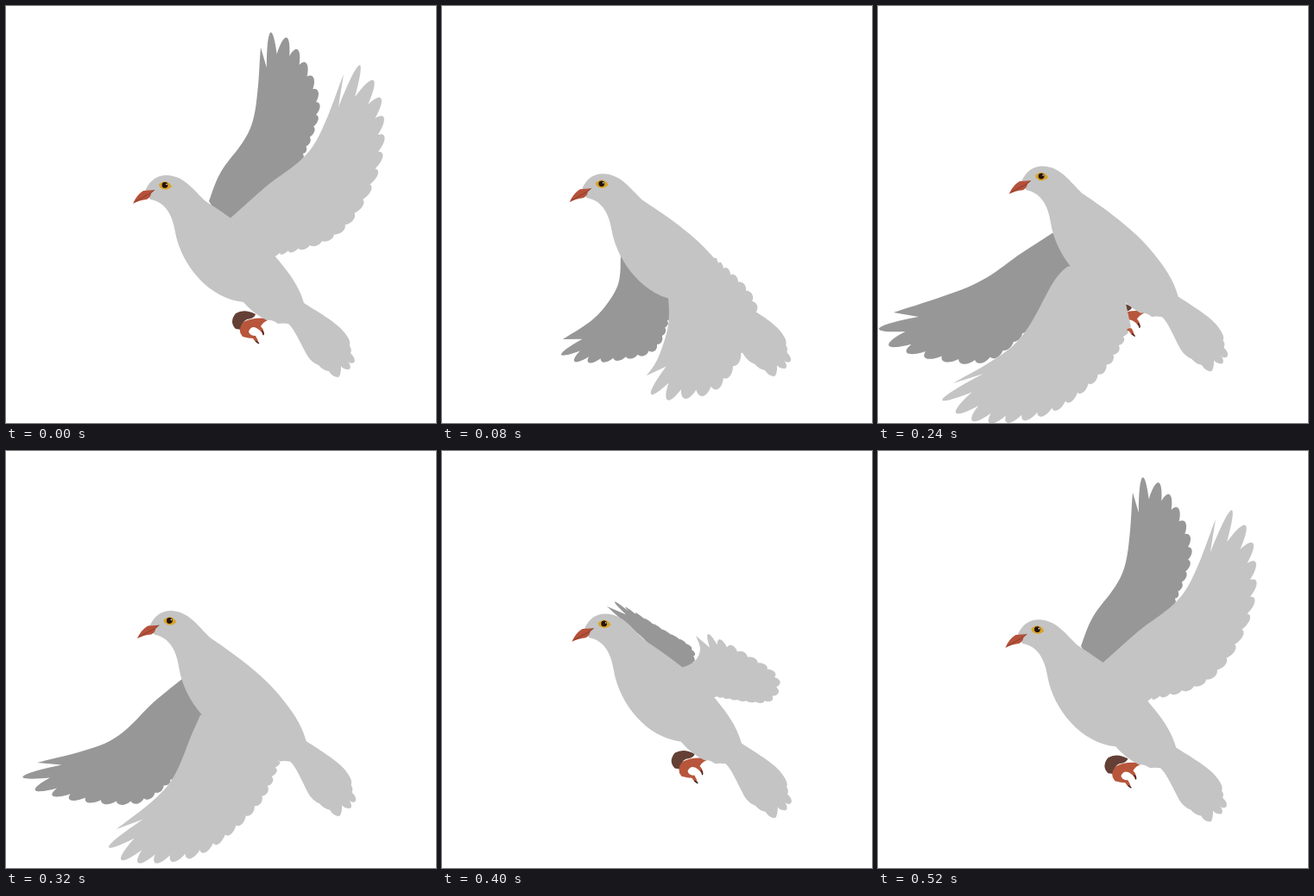
These frames come from a looping animation (498x483 px, 560 ms). An HTML page:

```html
<!DOCTYPE html>
<html lang="en">
<head>
<meta charset="utf-8">
<title>Flying dove</title>
<style>
  html, body { margin: 0; width: 100%; height: 100%; overflow: hidden; background: #fff; }
  svg { display: block; width: 498px; height: 483px; }
</style>
</head>
<body>
<svg viewBox="0 0 498 483">
  <path id="far" fill="#979797"/>
  <g id="feet">
    <path fill="#643f35" d="M289 357 Q276 350 266 356 Q258 366 266 374 L274 375 Q272 366 279 363 Q288 362 289 357Z"/>
    <path fill="#b8563b" d="M303 362 Q286 360 275 366 Q267 375 274 383 Q281 385 286 385 Q289 390 293 391 Q291 385 289 382 Q282 382 281 377 Q284 370 290 373 Q296 376 298 382 Q300 376 295 371 Q298 366 303 364Z"/>
    <path fill="none" stroke="#3a2420" stroke-width="1.4" d="M289 388 L293 391 M296 376 Q299 378 298 381"/>
  </g>
  <g id="body">
    <path fill="#c4c4c4" d="M161 215 C164 206 172 196 185 196 C206 196 217 213 231 226 C265 248 299 272 320 300 C334 317 341 330 345 344 C362 355 386 368 394 381 Q400 389 398 394 Q401 398 399 402 Q406 409 403 413 Q398 415 396 411 Q401 419 397 421 Q390 421 388 417 Q388 428 385 430 Q378 430 374 423 Q367 422 362 416 Q354 413 349 405 C340 389 334 374 327 368 Q320 367 315 368 Q308 363 302 364 Q286 356 275 343 C235 339 203 300 196 262 C193 243 185 227 167 224Z"/>
    <path fill="#b5513a" d="M147 229 Q151 219 159 214 L172 213 L168 217 Q168 221 163 224 Q154 225 147 229Z"/>
    <path fill="none" stroke="#7d3a2b" stroke-width=".8" d="M149 227 Q158 222 167 217 L172 213"/>
    <path fill="#d9a428" d="M177 207 Q184 200 190 206 L192 209 Q185 216 178 210Z"/>
    <circle cx="184" cy="207.5" r="3.4" fill="#24130c"/>
    <circle cx="186" cy="206.5" r=".8" fill="#fff"/>
  </g>
  <path id="near" fill="#c4c4c4"/>
</svg>
<script>
const LOOP = 560, STEP = 40, LEAD = 3;
const ROOT = [275, 290];

// Each pose: root, wrist, bend and tip of the leading edge, then the rim of the fan.
const pose = text => text.split(' ').map(p => p.split(',').map(Number));

const near = {
  up: pose('255,250 300,210 355,163 391,79 406,67 434,105 434,185 388,263 312,290'),
  side: pose('262,262 305,240 390,205 478,178 487,192 478,222 445,262 390,306 330,318'),
  down: pose('262,335 262,370 250,408 237,428 242,449 268,456 325,439 366,352 318,292'),
  spread: pose('219,302 203,320 160,390 87,437 76,458 120,483 200,472 262,424 293,372'),
  back: pose('225,306 216,326 187,388 128,438 120,460 148,477 225,468 292,412 320,355'),
  fold: pose('275,252 292,244 299,230 294,214 305,211 350,233 390,262 378,291 316,285')
};
const far = {
  up: pose('235,226 249,192 285,136 295,48 306,31 331,42 357,85 363,125 345,175'),
  side: pose('235,228 265,205 335,150 412,108 422,114 424,140 408,178 380,220 340,250'),
  down: pose('207,290 203,325 178,360 140,386 137,402 160,413 210,410 248,398 264,362'),
  spread: pose('202,263 165,287 110,323 18,355 2,370 12,393 70,411 130,411 180,370'),
  back: pose('204,264 172,290 120,336 36,361 20,375 32,392 85,406 155,408 195,380'),
  fold: pose('255,240 232,216 212,199 191,180 194,173 217,183 255,206 290,228 292,248')
};
const keys = [
  [0, 'up'], [40, 'side'], [80, 'down'], [160, 'spread'], [240, 'spread'],
  [320, 'back'], [400, 'fold'], [520, 'up'], [LOOP, 'up']
];

const mix = (a, b, u) => [a[0] + (b[0] - a[0]) * u, a[1] + (b[1] - a[1]) * u];
const str = p => p[0].toFixed(1) + ' ' + p[1].toFixed(1);

// Catmull-Rom curve through the points, as a fine polyline
function spline(pts, n = 12) {
  const out = [pts[0]];
  for (let i = 0; i < pts.length - 1; i++) {
    const b = pts[i], c = pts[i + 1], a = pts[i - 1] || b, d = pts[i + 2] || c;
    for (let k = 1; k <= n; k++) {
      const u = k / n;
      out.push([0, 1].map(j => b[j] + .5 * u * (c[j] - a[j] +
        u * (2 * a[j] - 5 * b[j] + 4 * c[j] - d[j] + u * (3 * (b[j] - c[j]) + d[j] - a[j])))));
    }
  }
  return out;
}

// Feather tips along the rim, each a little narrower than the one before
function featherTips(rim, count) {
  const line = spline(rim), sum = [0];
  for (let i = 1; i < line.length; i++)
    sum.push(sum[i - 1] + Math.hypot(line[i][0] - line[i - 1][0], line[i][1] - line[i - 1][1]));
  const total = sum[sum.length - 1];
  return Array.from({ length: count + 1 }, (_, k) => {
    const s = total * (1 - (1 - k / count) ** 1.3);
    const i = Math.max(1, sum.findIndex(v => v >= s - 1e-6));
    return mix(line[i - 1], line[i], (s - sum[i - 1]) / (sum[i] - sum[i - 1]));
  });
}

function feather(from, tip, to) {
  const c = mix(mix(from, to, .5), tip, 4 / 3);
  const side = [0, 1].map(j => (to[j] - from[j]) * .27);
  return 'C' + str([c[0] - side[0], c[1] - side[1]]) + ' ' + str([c[0] + side[0], c[1] + side[1]]) + ' ' + str(to);
}

function wingPath(pts, count) {
  const lead = spline(pts.slice(0, LEAD + 1));
  const tips = featherTips(pts.slice(LEAD), count);
  const heart = mix(pts[1], pts[LEAD + 4], .5);
  const notches = tips.slice(1).map((tip, i) =>
    mix(mix(tips[i], tip, .5), heart, .06 + .21 * Math.exp(-.6 * i)));
  let d = 'M' + lead.map(str).join('L') + 'L' + str(notches[0]);
  for (let i = 1; i < count; i++) d += feather(notches[i - 1], tips[i], notches[i]);
  return d + 'L' + str(tips[count]) + 'L' + str(ROOT) + 'Z';
}

function wingAt(poses, t) {
  const i = keys.findIndex((k, n) => t < keys[n + 1][0]);
  const [t0, a] = keys[i], [t1, b] = keys[i + 1];
  return poses[a].map((p, n) => mix(p, poses[b][n], (t - t0) / (t1 - t0)));
}

const el = id => document.getElementById(id);

function draw(t) {
  const lift = 1.05 * Math.sin(Math.PI * (t - 10) / LOOP) ** 2;
  const move = x => `translate(${x * lift} ${-7 * lift}) rotate(${1.1 * lift} 384 430)`;
  el('body').setAttribute('transform', move(1));
  el('feet').setAttribute('transform', move(4));
  el('near').setAttribute('d', wingPath(wingAt(near, t), 17));
  el('far').setAttribute('d', wingPath(wingAt(far, t), 12));
}

let start;
function tick(now) {
  if (start === undefined) start = now;
  draw(Math.floor(Math.max(0, now - start) % LOOP / STEP) * STEP);
  requestAnimationFrame(tick);
}
draw(0);
requestAnimationFrame(tick);
</script>
</body>
</html>
```
